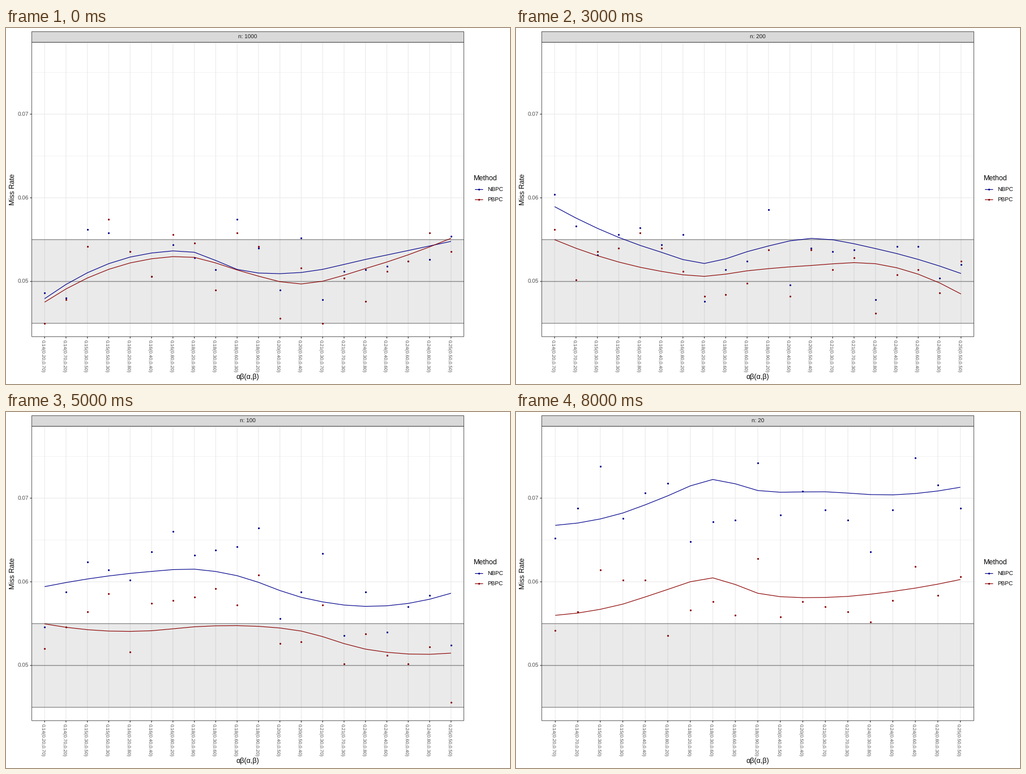
A matplotlib script for the animation above (9 s loop, 890 by 629 pixels).

```python
import numpy as np
import matplotlib.pyplot as plt
from matplotlib.animation import FuncAnimation
from matplotlib.patches import Rectangle

W, H, DPI = 890, 629, 64
PT = 72 / DPI                       # points per pixel
LEFT, RIGHT, TOP, BOTTOM = 45.5, 808.5, 25.2, 545.3
STRIP_TOP = 6.4
SIZES = (1000, 500, 250, 200, 150, 100, 75, 50, 20)
REPS = 5000                         # simulation runs behind each dot
METHODS = (("NBPC", "#00008B"), ("PBPC", "#8B0000"))
GRID, DARK, MID = "#EBEBEB", "#333333", "#7F7F7F"
SMALL, LARGE, TINY = 10, 12.5, 8.45

plt.rcParams["font.family"] = "Liberation Sans"
plt.rcParams["text.hinting"] = "none"

# alpha and beta of each condition, ordered by their product
PAIRS = sorted(
    ((a, b) for a in range(2, 10) for b in range(2, 10)
     if 14 <= a * b <= 25 and a + b <= 11 and (a, b) not in ((3, 5), (5, 3))),
    key=lambda p: (p[0] * p[1], p))
PAIRS = [(2, 7), (7, 2), (3, 5), (5, 3), (2, 8), (4, 4), (8, 2), (2, 9), (3, 6),
         (6, 3), (9, 2), (4, 5), (5, 4), (3, 7), (7, 3), (3, 8), (4, 6), (6, 4),
         (8, 3), (5, 5)]

# miss rate trends (1e-5) of both methods at a few key conditions
TREND = {
    1000: ([4794, 5213, 5340, 5349, 5144, 5107, 5263, 5479],
           [4752, 5145, 5271, 5288, 5137, 4970, 5154, 5516]),
    500: ([4782, 5197, 5374, 5461, 5258, 5115, 5090, 5235],
          [4714, 5135, 5257, 5249, 5046, 4955, 4988, 5259]),
    200: ([5894, 5526, 5348, 5215, 5356, 5515, 5393, 5095],
          [5499, 5232, 5120, 5061, 5127, 5191, 5212, 4850]),
    100: ([5942, 6070, 6124, 6151, 6073, 5814, 5706, 5863],
          [5497, 5411, 5415, 5462, 5476, 5411, 5195, 5147]),
    50: ([6171, 6504, 6565, 6504, 6434, 6365, 6428, 6348],
         [5215, 5574, 5692, 5716, 5564, 5305, 5384, 5763]),
    20: ([6675, 6822, 7028, 7223, 7091, 7076, 7039, 7130],
         [5599, 5733, 5909, 6047, 5863, 5813, 5885, 6027]),
}


def key_rates(n):
    """Key points of one size; sizes without their own lie midway."""
    if n in TREND:
        return np.array(TREND[n]) / 1e5
    i = SIZES.index(n)
    return (key_rates(SIZES[i - 1]) + key_rates(SIZES[i + 1])) / 2


def spline(x, kx, ky):
    """Cubic Hermite curve through the key points."""
    slope = np.gradient(ky, kx, edge_order=2)
    i = np.clip(np.searchsorted(kx, x) - 1, 0, len(kx) - 2)
    step = kx[i + 1] - kx[i]
    t = (x - kx[i]) / step
    return (ky[i] * (1 + 2 * t) * (1 - t) ** 2
            + slope[i] * step * t * (1 - t) ** 2
            + ky[i + 1] * t * t * (3 - 2 * t)
            + slope[i + 1] * step * t * t * (t - 1))


def simulate(n):
    """Conditions, smooth rates and binomially scattered rates for one size."""
    pairs = [p for p in PAIRS if n > 20 or p != (2, 8)]
    count = len(pairs)
    kx = np.array([1, 4, 6, 8, 10, 13, 16, count], float)
    curves = np.array([spline(np.arange(1.0, count + 1), kx, ky)
                       for ky in key_rates(n)])
    rng = np.random.default_rng(n)
    # both methods see the same samples, so most of the noise is shared
    noise = 0.9 * rng.normal(size=count) + 0.4 * rng.normal(size=curves.shape)
    spread = np.sqrt(curves * (1 - curves) / REPS)
    dots = np.round((curves + spread * np.clip(noise, -1.9, 1.9)) * REPS) / REPS
    return pairs, curves, dots


DATA = {n: simulate(n) for n in SIZES}

# ---- drawing, in pixels from the top left ----
fig = plt.figure(figsize=(W / DPI, H / DPI), dpi=DPI, facecolor="white")
ax = fig.add_axes([0, 0, 1, 1])


def rate_y(rate):
    return 447.8 - (rate - 0.05) * 14780


def line(xs, ys, color, width, z):
    ax.plot(xs, ys, color=color, lw=width * PT, zorder=z, snap=False,
            solid_capstyle="butt", solid_joinstyle="round")


def across(rate, color, width, z):
    line([LEFT, RIGHT], [rate_y(rate)] * 2, color, width, z)


def dots(xs, ys, color):
    ax.plot(xs, ys, "o", color=color, ms=3.2 * PT, mew=0, zorder=5, snap=False)


def box(y0, y1, z, **style):
    ax.add_patch(Rectangle((LEFT, y0), RIGHT - LEFT, y1 - y0, zorder=z,
                           snap=False, **style))


def text(x, y, s, size, color="black", ha="left", turn=0):
    ax.text(x, y, s, fontsize=size * PT, color=color, ha=ha, va="baseline",
            rotation=turn, rotation_mode="anchor", zorder=9)


def panel(xs, pairs, title):
    for rate in (0.045, 0.055, 0.065, 0.075):
        across(rate, GRID, 0.6, 1)
    for rate in (0.05, 0.06, 0.07):
        y = rate_y(rate)
        across(rate, GRID, 1.2, 1)
        line([LEFT - 3.1, LEFT], [y, y], DARK, 1.2, 1)
        text(LEFT - 5.4, y + 3.6, f"{rate:.2f}", SMALL, "#4D4D4D", "right")
    for x, (a, b) in zip(xs, pairs):
        line([x, x], [TOP, BOTTOM], GRID, 1.2, 1)
        line([x, x], [BOTTOM, BOTTOM + 3.1], DARK, 1.2, 1)
        label = f"{a * b / 100:.2f}({a / 10:.2f},{b / 10:.2f})"
        text(x - 5.9, BOTTOM + 5.3, label, TINY, "#4D4D4D", turn=270)
    box(rate_y(0.055), rate_y(0.045), 2, fc=DARK, ec="none", alpha=0.1)
    for rate in (0.045, 0.05, 0.055):
        across(rate, MID, 1.2, 3)
    box(TOP, BOTTOM, 7, fc="none", ec=DARK, lw=0.8 * PT)
    box(STRIP_TOP, TOP, 7, fc="#D9D9D9", ec=DARK, lw=0.8 * PT)
    mid_x, mid_y = (LEFT + RIGHT) / 2, (TOP + BOTTOM) / 2
    text(mid_x, 19.2, title, SMALL, "#1A1A1A", "center")
    text(mid_x, 620.4, "αβ(α,β)", LARGE, ha="center")
    text(15.3, mid_y, "Miss Rate", LARGE, ha="center", turn=90)


def legend():
    text(826, 268.6, "Method", LARGE)
    for i, (name, color) in enumerate(METHODS):
        y = 285.4 + 18 * i
        line([828.1, 842.5], [y, y], color, 1.15, 5)
        dots([835.3], [y], color)
        text(850.5, y + 3.6, name, SMALL)


def draw(frame):
    n = SIZES[frame]
    pairs, curves, rates = DATA[n]
    step = (RIGHT - LEFT) / (len(pairs) + 0.2)
    xs = LEFT + step * (np.arange(len(pairs)) + 0.6)

    ax.clear()
    ax.axis("off")
    ax.set_xlim(0, W)
    ax.set_ylim(H, 0)
    panel(xs, pairs, f"n: {n}")
    legend()
    for (_, color), curve, rate in zip(METHODS, curves, rates):
        dots(xs, rate_y(rate), color)
        line(xs, rate_y(curve), color, 1.15, 6)
    return ax.get_children()


anim = FuncAnimation(fig, draw, frames=len(SIZES), interval=1000,
                     repeat=True, repeat_delay=0, blit=False)
plt.show()
```
